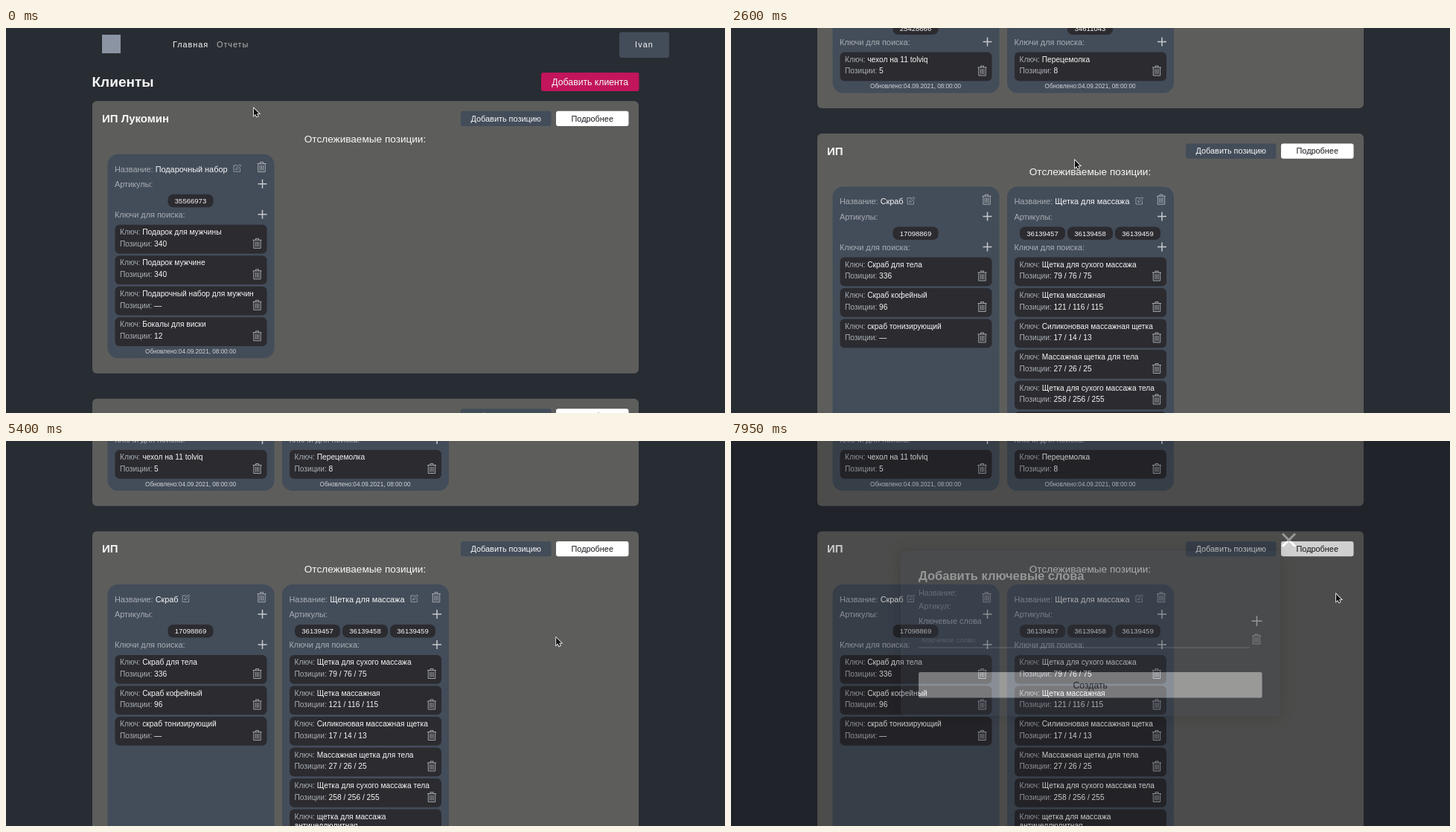
An HTML page with a canvas that plays this animation: 966x518 px, repeating every 8 s.

```html
<!DOCTYPE html>
<html lang="ru">
<head>
<meta charset="utf-8">
<style>
  html, body { margin: 0; width: 100%; height: 100%; overflow: hidden; background: #282c33; }
  canvas { display: block; }
</style>
</head>
<body>
<canvas id="stage" width="966" height="518"></canvas>
<script>
const W = 966, H = 518, LOOP = 8000;
const BG = '#282c33', PANEL = '#5d5e5c', SLATE = '#434c59', DARK = '#2b2b30';
const WHITE = '#f8f8f8', MUTED = '#a9aeb5', ICON = '#b2b6bb';
const PX = 0.68; // page zoom

const screen = document.getElementById('stage').getContext('2d');
const layer = Object.assign(document.createElement('canvas'), { width: W, height: H });
const layerCtx = layer.getContext('2d');
let ctx = screen;

const clients = [
  { name: 'ИП Лукомин', cards: [
    { name: 'Подарочный набор ', articles: ['35566973'], keys: [
      ['Подарок для мужчины', '340'], ['Подарок мужчине', '340'],
      ['Подарочный набор для мужчин', '—'], ['Бокалы для виски', '12']] }] },
  { name: 'Test 3', cards: [
    { name: 'Чехол', articles: ['25428666'], keys: [['чехол на 11 tolviq', '5']] },
    { name: 'Перецемолка', articles: ['34611043'], keys: [['Перецемолка', '8']] }] },
  { name: 'ИП', cards: [
    { name: 'Скраб', articles: ['17098869'], keys: [
      ['Скраб для тела', '336'], ['Скраб кофейный', '96'], ['скраб тонизирующий', '—']] },
    { name: 'Щетка для массажа ', hovers: true, articles: ['36139457', '36139458', '36139459'], keys: [
      ['Щетка для сухого массажа', '79 / 76 / 75'], ['Щетка массажная', '121 / 116 / 115'],
      ['Силиконовая массажная щетка', '17 / 14 / 13'], ['Массажная щетка для тела', '27 / 26 / 25'],
      ['Щетка для сухого массажа тела', '258 / 256 / 255'],
      ['щетка для массажа\nантицеллюлитная', '94 / 92 / 90']] }] },
];

// The picture is held between these moments.
const shifted = { 2000: 1950, 5000: 4950, 6000: 5970 };
const moments = Array.from({ length: 40 }, (_, i) => i * 200)
  .filter(ms => ms !== 7400 && ms !== 7600)
  .map(ms => shifted[ms] ?? ms)
  .concat(7950);

// Piecewise linear value over [time, value] stops.
function track(t, stops) {
  let [t0, v0] = stops[0];
  for (const [t1, v1] of stops) {
    if (t < t1) return t <= t0 ? v0 : v0 + (v1 - v0) * (t - t0) / (t1 - t0);
    [t0, v0] = [t1, v1];
  }
  return v0;
}

const scrollAt = t => track(t, [[300, 0], [1200, 204.8], [1950, 416.8], [2600, 632.8], [2800, 653.3]]);
const hoverAt = t => track(t, [[3000, 0], [3200, 1], [3850, 1], [4100, 0], [5450, 0], [5650, 1], [6420, 1], [6620, 0]]);
const confirmAt = t => track(t, [[3820, 0], [4120, 1], [5050, 1], [5350, 0]]);
const keywordsAt = t => track(t, [[6310, 0], [6610, 1], [7770, 1], [8070, -0.05]]);
const pointerX = t => track(t, [[0, 333], [700, 462], [2850, 462], [3500, 482], [4150, 482], [4800, 802], [5200, 802], [5900, 582], [6450, 582], [7150, 813]]);
const pointerY = t => track(t, [[0, 108], [700, 178], [2850, 178], [3500, 255], [4150, 255], [4800, 262], [5200, 262], [5900, 271], [6450, 271], [7150, 206]]);

function box(x, y, w, h, r, fill) {
  ctx.fillStyle = fill;
  ctx.beginPath();
  ctx.roundRect(x, y, w, h, r);
  ctx.fill();
}

// Writes text centred vertically on y; returns where it ends.
function text(str, x, y, size, color = WHITE, { bold, align = 'left', spacing = 0 } = {}) {
  const px = size * PX;
  ctx.font = `${bold ? 'bold ' : ''}${px}px "Liberation Sans", Arial, sans-serif`;
  ctx.textAlign = align;
  ctx.letterSpacing = spacing + 'px';
  ctx.fillStyle = color;
  ctx.fillText(str, x, y + px * 0.35);
  return x + ctx.measureText(str).width;
}

function button(label, x, y, w, h, size, fill, color, r = 3) {
  box(x, y, w, h, r, fill);
  text(label, x + w / 2, y + h / 2, size, color, { align: 'center' });
}

function strokePath(path, x, y, color, width) {
  ctx.save();
  ctx.translate(x, y);
  ctx.strokeStyle = color;
  ctx.lineWidth = width;
  ctx.stroke(new Path2D(path));
  ctx.restore();
}

const trash = (x, y, color = ICON) =>
  strokePath('M-6-4.5H6M-2-4.5V-6.5H2V-4.5M-4.7-4.5V6.5H4.7V-4.5M-2.2-2.5V4.7M0-2.5V4.7M2.2-2.5V4.7', x, y, color, 0.9);
const plus = (x, y, size = 6, color = '#c6c9cd') =>
  strokePath(`M${-size} 0H${size}M0 ${-size}V${size}`, x, y, color, 1.5);
const pencil = (x, y) =>
  strokePath('M1-4H-4.5V4.5H4V0M-1.8 2L-1.2-.3L3.6-5.2L5.3-3.5L.5 1.4Z', x, y, '#9aa0a8', 0.9);

function keyBox([label, place], x, y) {
  const lines = label.split('\n');
  const extra = (lines.length - 1) * 12;
  box(x, y, 204, 38.7 + extra, 6, DARK);
  const start = text('Ключ: ', x + 6.5, y + 9.5, 15, MUTED);
  lines.forEach((line, i) => text(line, i ? x + 6.5 : start, y + 9.5 + i * 12, 15));
  text(place, text('Позиции: ', x + 6.5, y + 25.2 + extra, 15, MUTED), y + 25.2 + extra, 15);
  trash(x + 191, y + 25 + extra);
}

function drawCard(card, x, y, h, hover) {
  box(x, y, 224, h, 14, SLATE);
  if (card.hovers && hover) box(x, y, 224, h, 14, `rgba(0,0,0,${hover})`);
  const nameEnd = text(card.name, text('Название: ', x + 9.5, y + 20, 16, MUTED), y + 20, 16);
  pencil(nameEnd + 10, y + 19);
  trash(x + 207, y + 17.2);
  text('Артикулы:', x + 9.5, y + 40.5, 16, MUTED);
  plus(x + 208, y + 40);
  card.articles.forEach((article, i) => {
    const cx = x + 111.5 + (i - (card.articles.length - 1) / 2) * 64;
    button(article, cx - 30.5, y + 54, 61, 17.5, 14, DARK, WHITE, 7);
  });
  text('Ключи для поиска:', x + 9.5, y + 81.3, 16, MUTED);
  plus(x + 208, y + 81);
  card.keys.forEach((key, i) => keyBox(key, x + 10, y + 95 + i * 41.5));
  text('Обновлено:04.09.2021, 08:00:00', x + 111.5, y + h - 9.3, 12, '#d2d5d9', { align: 'center' });
}

function drawHeader() {
  box(129, 9, 25, 25, 0, '#8a94a2');
  text('Главная', 224, 22.5, 16, WHITE, { spacing: 0.95 });
  text('Отчеты', 283, 22.5, 16, '#b4b7bb', { spacing: 0.95 });
  box(824, 5.5, 67, 34.5, 3, SLATE);
  text('Ivan', 857.5, 22.5, 16, WHITE, { align: 'center', spacing: 1.1 });
  text('Клиенты', 115.5, 72, 28, WHITE, { bold: true });
  button('Добавить клиента', 719, 60, 131.5, 25, 18, '#c2155b', WHITE);
}

function drawPage(scroll, hover) {
  ctx.save();
  ctx.translate(0, -scroll);
  drawHeader();
  let y = 98.3;
  for (const client of clients) {
    const cardHeight = 108.5 + 41.5 * Math.max(...client.cards.map(c => c.keys.length));
    const height = cardHeight + 92;
    box(116, y, 734, height, 6, PANEL);
    text(client.name, 129, y + 23.5, 22, WHITE, { bold: true });
    button('Добавить позицию', 611, y + 13.4, 121.5, 20.4, 16, SLATE, WHITE);
    button('Подробнее', 739, y + 13.4, 97.5, 20.4, 16, '#fff', '#16181c');
    text('Отслеживаемые позиции:', 482.5, y + 51, 20, WHITE, { align: 'center' });
    client.cards.forEach((card, i) => drawCard(card, 136.5 + i * 234.5, y + 71.5, cardHeight, hover));
    y += height + 34;
  }
  ctx.restore();
}

// Dims the page and fades the whole dialog as one layer.
function dialog(opacity, height, title, drawBody) {
  if (opacity <= 0) return;
  ctx = layerCtx;
  ctx.clearRect(0, 0, W, H);
  ctx.fillStyle = 'rgba(0,0,0,.5)';
  ctx.fillRect(0, 0, W, H);
  const top = 259 - height / 2;
  ctx.shadowColor = 'rgba(0,0,0,.65)';
  ctx.shadowBlur = 18;
  box(228, top, 510, height, 6, '#282c34');
  ctx.shadowColor = 'transparent';
  text(title, 252, top + 33, 24.3, WHITE, { bold: true });
  strokePath('M-8.5-8.5L8.5 8.5M8.5-8.5L-8.5 8.5', 749.5, top - 14.7, '#fff', 3);
  drawBody(top);
  ctx = screen;
  ctx.globalAlpha = opacity;
  ctx.drawImage(layer, 0, 0);
  ctx.globalAlpha = 1;
}

function confirmBody(top) {
  text('Удалить артикул: 36139458?', 482.5, top + 67.3, 16, WHITE, { align: 'center' });
  button('Да', 252, top + 97.5, 461.5, 34.5, 18, '#fff', '#16181c', 2);
}

function keywordsBody(top, name) {
  text('Название: ' + name, 252, top + 56.5, 16, '#a4a7ab');
  text('Артикул:', 252, top + 74, 16, '#a4a7ab');
  text('Ключевые слова', 252, top + 94.2, 16, '#d5d7d9');
  plus(706.5, top + 94.3, 7, WHITE);
  text('Ключевое слово', 256, top + 120, 14, '#777b80');
  box(252, top + 129.5, 445, 1, 0, '#85888c');
  trash(706, top + 118.5, '#d0d2d4');
  button('Создать', 252, top + 163, 461.5, 34.5, 18, '#fff', '#16181c', 2);
}

function drawPointer(t) {
  const x = pointerX(t), y = pointerY(t);
  if (t >= 6300 && t < 6600) {
    const beam = 'M-2.5-6Q0-6 0-4V4Q0 6-2.5 6M2.5-6Q0-6 0-4V4Q0 6 2.5 6';
    strokePath(beam, x + 2, y + 4, '#111', 2.6);
    strokePath(beam, x + 2, y + 4, '#fff', 1.3);
    return;
  }
  const arrow = 'M0 0V10L2.3 7.9L3.9 11.5L5.6 10.7L4.1 7.2H7.2Z';
  strokePath(arrow, x, y, '#fff', 1.6);
  ctx.save();
  ctx.translate(x, y);
  ctx.fillStyle = '#111';
  ctx.fill(new Path2D(arrow));
  ctx.restore();
}

function render(now) {
  const clock = now % LOOP;
  const t = moments.filter(ms => ms <= clock).pop();
  ctx.fillStyle = BG;
  ctx.fillRect(0, 0, W, H);
  drawPage(scrollAt(t), hoverAt(t));
  dialog(confirmAt(t), 156, 'Вы уверены?', confirmBody);
  dialog(keywordsAt(t), 222, 'Добавить ключевые слова',
    top => keywordsBody(top, t < 7770 ? 'Щетка для массажа' : ''));
  drawPointer(t);
}

const start = performance.now();
function tick() {
  render(performance.now() - start);
  requestAnimationFrame(tick);
}
tick();
</script>
</body>
</html>
```
